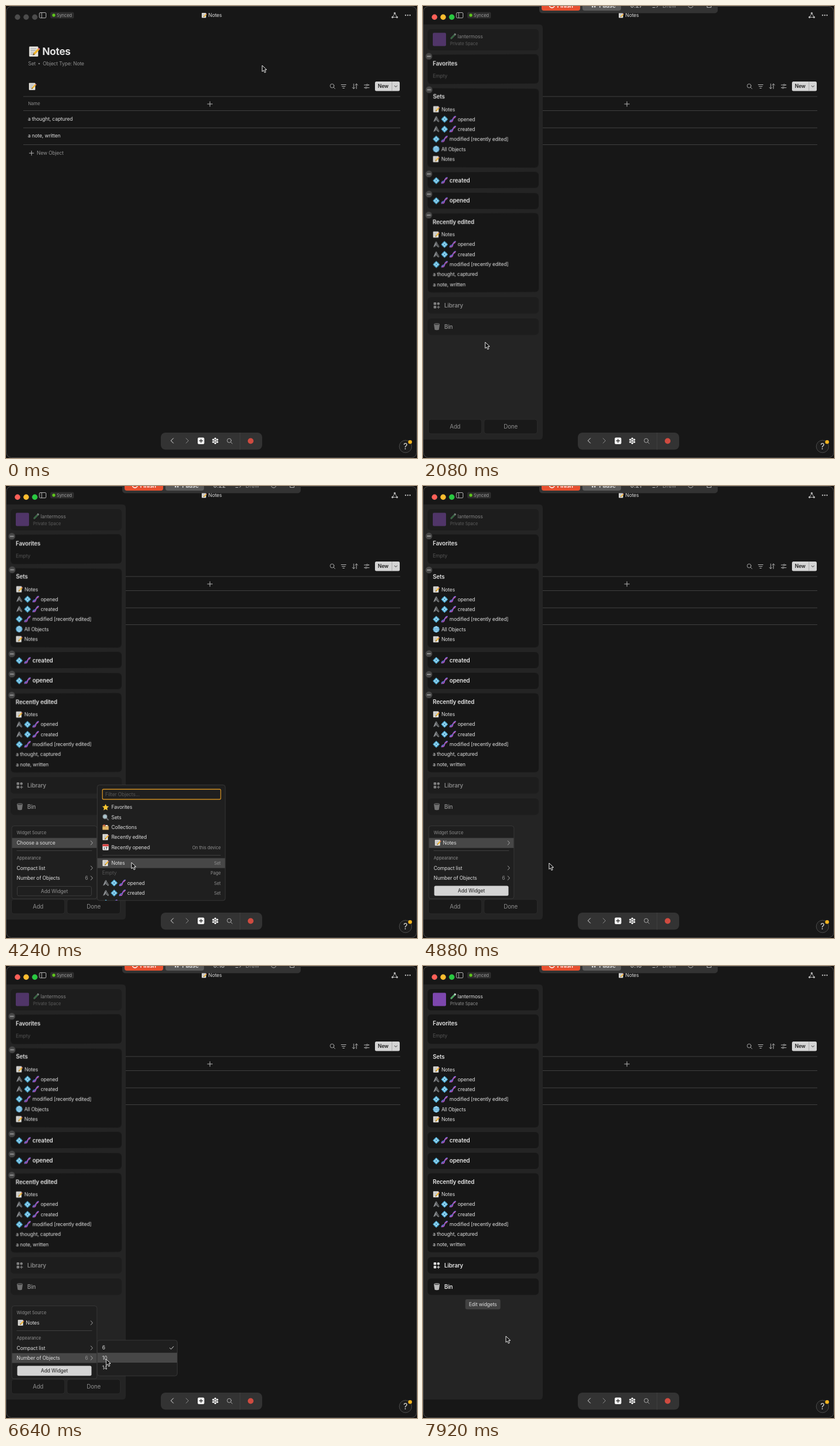
Write an HTML page that moves like this. It is 714 px wide and 784 px high and loops after 8000 ms.

```html
<!DOCTYPE html>
<html lang="en">
<head>
<meta charset="utf-8">
<title>Notes</title>
<style>
html, body { margin: 0; width: 100%; height: 100%; overflow: hidden; background: #101010; }
svg.stage { display: block; width: 714px; height: 784px; }
text { font: 400 8.66px Inter, sans-serif; letter-spacing: -.13px; fill: #dedede; white-space: pre; }
.small { font-size: 7.43px; letter-spacing: -.03px; }
.dim { fill: #8f8f8f; }
.faint { fill: #555; }
.head { font-size: 9.9px; font-weight: 600; fill: #e4e4e4; }
.btn { font-size: 9.9px; fill: #8d8d8d; }
.mid { text-anchor: middle; }
.end { text-anchor: end; }
.line { fill: none; stroke: #b4b4b4; stroke-linecap: round; stroke-linejoin: round; }
.rule { stroke: #404040; stroke-width: 1; }
.card { fill: #171717; }
.pop { fill: #1f1f1f; stroke: #3d3d3d; stroke-width: .8; }
.hover { fill: #474747; }
.side { animation: slide 8s infinite; }
.fade { animation: dim 8s step-end infinite; }
.cursor { animation: point 8s ease-in-out infinite; }
@keyframes slide {
  0%, 9% { transform: translateX(-212px); animation-timing-function: ease-out; }
  12%, 100% { transform: none; }
}
@keyframes dim {
  0% { opacity: 1; }
  19% { opacity: .5; }
  94%, 100% { opacity: 1; }
}
@keyframes point {
  0%, 4% { transform: translate(445px, 103px); }
  9%, 11% { transform: translate(5px, 250px); }
  18%, 27% { transform: translate(108px, 583px); }
  32%, 33% { transform: translate(56px, 724px); }
  38%, 43% { transform: translate(106px, 621px); }
  51%, 59% { transform: translate(218px, 653px); }
  61%, 65% { transform: translate(219px, 654px); }
  73%, 76% { transform: translate(110px, 675px); }
  81%, 84% { transform: translate(174px, 682px); }
  88%, 90% { transform: translate(86px, 697px); }
  93%, 94% { transform: translate(150px, 724px); }
  98%, 100% { transform: translate(144px, 642px); }
}
</style>
</head>
<body>
<svg class="stage" viewBox="0 0 714 784">
<defs>
  <symbol id="memo" viewBox="0 0 16 16">
    <rect x="1" y="1" width="12.5" height="14" rx="1" fill="#e6e4de"/>
    <path d="M3 4h8M3 6.5h7M3 9h5M3 11.5h4" stroke="#9a9ea6" stroke-width=".9"/>
    <path d="M6 13.2l1-3 6-6.4 2 1.9-6 6.4z" fill="#f0b429"/>
    <path d="M13 3.8l1.2-1.2 2 1.9L15 5.7z" fill="#e0707a"/>
    <path d="M6 13.2l1-3 2 1.9z" fill="#6b5136"/>
  </symbol>
  <symbol id="clip" viewBox="0 0 16 16">
    <path d="M2 14L7 2.5q1.5-1.6 2.3.5L5.5 12q-1 1.500-1.600 0L7 5M9 4l5 8q.6 2.500-1.600 1.800L8 7M11 13L8.500 9" fill="none" stroke="#a9adb2" stroke-width="1.2"/>
  </symbol>
  <symbol id="dia" viewBox="0 0 16 16">
    <path d="M8 0l8 8-8 8-8-8z" fill="#58b8e0"/>
    <path d="M8 3.200L12.800 8 8 12.800 3.200 8z" fill="#c4edf8"/>
    <path d="M8 5.500L10.500 8 8 10.500 5.500 8z" fill="#4aa5d8"/>
    <path d="M3 3l10 10M13 3L3 13" stroke="#2f84b8" stroke-width=".8"/>
  </symbol>
  <symbol id="dna" viewBox="0 0 16 16">
    <path d="M1 15C1 8 8 11 9 7s3-6 6-6" fill="none" stroke="#4579d8" stroke-width="2.300"/>
    <path d="M1 13c5 2 7-1 7-5s4-3 7-7" fill="none" stroke="#a755c8" stroke-width="2.300"/>
    <path d="M3 10l3 3M10 4l3 2M11 2.500l2.500 2" stroke="#d8668f"/>
  </symbol>
  <symbol id="globe" viewBox="0 0 16 16">
    <circle cx="8" cy="8" r="7.500" fill="#4aa3d4"/>
    <path d="M8 .5v15M.5 8h15M2 4h12M2 12h12M8 .5q-8 7.500 0 15M8 .5q8 7.500 0 15" fill="none" stroke="#cdeaf6" stroke-width=".9"/>
  </symbol>
  <symbol id="tube" viewBox="0 0 16 16">
    <path d="M3 13L13 3" stroke="#b9d3c5" stroke-width="4" stroke-linecap="round"/>
    <path d="M3 13l7-7" stroke="#3fa655" stroke-width="3.200" stroke-linecap="round"/>
    <path d="M11 1l4 4" stroke="#d6e2dd" stroke-width="1.500"/>
  </symbol>
  <symbol id="star" viewBox="0 0 16 16"><path d="M8 .5l2.300 5 5.300.6-4 3.700 1.100 5.400L8 12.500l-4.700 2.700 1.100-5.400-4-3.700 5.300-.6z" fill="#f7c531"/></symbol>
  <symbol id="lens" viewBox="0 0 16 16">
    <path d="M9 9l5 5" stroke="#6e6e72" stroke-width="2.800" stroke-linecap="round"/>
    <circle cx="6.500" cy="6.500" r="5" fill="#a9c3cc" stroke="#77797d" stroke-width="1.400"/>
  </symbol>
  <symbol id="box" viewBox="0 0 16 16">
    <path d="M1 3h5l1 1.500h8V14H1z" fill="#b9813d"/><path d="M3 2h4v3H3z" fill="#d65d4a"/>
    <path d="M8 3h5v3H8z" fill="#e9e4d6"/><path d="M1 6.500h14V14H1z" fill="#e0b566"/>
  </symbol>
  <symbol id="cal" viewBox="0 0 16 16">
    <rect x="1" y="1" width="14" height="14" rx="1.500" fill="#eee"/><path d="M1 2.500q0-1.500 1.500-1.500h11q1.500 0 1.500 1.500V6H1z" fill="#d64545"/>
    <path d="M5 8v5.500M8 8.300h3.500L9 13.500" fill="none" stroke="#333" stroke-width="1.300"/>
  </symbol>
  <symbol id="search" viewBox="0 0 12 12"><circle cx="5.200" cy="5.200" r="3.900" class="line"/><path d="M8.200 8.200L11 11" class="line"/></symbol>
  <symbol id="next" viewBox="0 0 6 10"><path d="M1.200 1.200L4.600 5 1.200 8.800" class="line"/></symbol>
  <clipPath id="listClip"><rect x="159" y="519" width="222" height="199.500"/></clipPath>
  <clipPath id="loadClip"><rect x="159" y="570" width="222" height="23.500"/></clipPath>
</defs>

<rect x=".5" y=".5" width="713" height="783" rx="9" fill="#171717" stroke="#4b4b4b"/>

<!-- page -->
<use href="#memo" x="39" y="69" width="20" height="20"/>
<text x="63" y="85" style="font-size:17.6px;font-weight:700;letter-spacing:-.35px">Notes</text>
<text x="38.500" y="102.800" class="dim">Set</text><circle cx="57.500" cy="100" r="1.200" fill="#8f8f8f"/>
<text x="64" y="102.800" class="dim">Object Type: Note</text>
<use href="#memo" x="39" y="132.500" width="14" height="14"/>
<use href="#search" x="562" y="134" width="10.500" height="10.500"/>
<path class="line" d="M582.300 136.500h8.400M583.700 139.500h5.600M585.200 142.500h2.600M604 135v8.500M601.800 141.300l2.200 2.200 2.200-2.200M608.800 143.500V135M606.600 137.200l2.200-2.200 2.200 2.200M622.300 137h3.600M629 137h2M622.300 141.700h1.600M627 141.700h4"/>
<g class="line"><circle cx="627.500" cy="137" r="1.400"/><circle cx="625.400" cy="141.700" r="1.400"/></g>
<rect x="641" y="131" width="43" height="16.500" rx="2.500" fill="#d4d4d4"/>
<path d="M670.500 131v16.500" stroke="#9a9a9a" stroke-width=".7"/>
<text x="646" y="142.300" style="font-weight:600;fill:#1d1d1d">New</text>
<path class="line" d="M675 138.300l2.200 2.200 2.200-2.200" style="stroke:#333"/>
<path class="rule" d="M30 157h655M30 181.500h655M30 211.300h655M30 240.500h655"/>
<text x="38.500" y="171.800" class="small dim">Name</text>
<path class="line" d="M350 170h8.500M354.250 165.800v8.400M40.500 255.200h7.600M44.300 251.400v7.600"/>
<text x="38" y="198.700">a thought, captured</text>
<text x="38" y="228.300">a note, written</text>
<text x="53.500" y="258.200" class="dim">New Object</text>

<!-- title bar -->
<g fill="#4b4b4b"><circle cx="20" cy="19.200" r="4.700"/><circle cx="35" cy="19.200" r="4.700"/><circle cx="50" cy="19.200" r="4.700"/></g>
<g data-on="4 100"><circle cx="20" cy="19.200" r="4.700" fill="#fe5f57"/><circle cx="35" cy="19.200" r="4.700" fill="#febc2e"/><circle cx="50" cy="19.200" r="4.700" fill="#28c840"/></g>
<g class="line"><rect x="58" y="11.500" width="11.500" height="9.200" rx="1.500"/><path d="M62 11.500v9.200"/></g>
<rect x="77" y="10.500" width="41" height="11" rx="2.500" fill="#2d2d2d"/><circle cx="83" cy="16" r="2.700" fill="#5dc41c"/>
<text x="88" y="18.700" class="small" style="fill:#9c9c9c">Synced</text>
<use href="#memo" x="339.500" y="11.500" width="9.500" height="9.500"/><text x="351.500" y="19">Notes</text>
<path class="line" d="M675.300 13l-3.800 6.500h7.600z"/>
<g fill="#b4b4b4"><circle cx="675.300" cy="12.500" r="1.700"/><circle cx="671.400" cy="19.500" r="1.700"/><circle cx="679.300" cy="19.500" r="1.700"/>
<circle cx="694.200" cy="16" r="1.200"/><circle cx="698" cy="16" r="1.200"/><circle cx="701.800" cy="16" r="1.200"/></g>

<g class="side" id="side"></g>

<!-- recorder bar -->
<g data-on="0 1">
  <rect x="150" y="-20" width="414.500" height="32.500" rx="5" fill="#333"/>
  <rect x="154" y="-12" width="67" height="19.500" rx="4" fill="#3f8ae0"/>
  <path class="line" d="M164 2l4-4M171 2l-3-4" style="stroke:#fff"/>
  <text x="174" y="2" class="head" style="fill:#fff">Starting</text><text x="236" y="2" class="head dim">0:00</text>
  <path class="line" d="M544.500 2.500l8-8M552.500 2.500l-8-8M530.500 0v2"/>
</g>
<g data-on="1 100">
  <rect x="202" y="-20" width="310" height="32.500" rx="5" fill="#333"/>
  <rect x="206" y="-12" width="67" height="20" rx="4" fill="#e8502f"/><rect x="277" y="-12" width="67" height="20" rx="4" fill="#5a5a5a"/>
  <circle cx="224" cy="-1.500" r="4.500" fill="none" stroke="#fff" stroke-width="1.300"/>
  <text x="233" y="2.500" class="head" style="fill:#fff">Finish</text>
  <path d="M294.500-6v8.500M298.500-6v8.500" stroke="#eee" stroke-width="2"/><text x="306" y="2.500" class="head">Pause</text>
  <text id="clock" x="360" y="2.500" class="head" style="fill:#aaa"></text>
  <path class="line" d="M399 2.500h4M406 2.500l4-5"/><text x="416" y="2.500" class="btn">Draw</text>
  <circle class="line" cx="465" cy="-1.500" r="4.500"/><path class="line" d="M493.500-4v6.500h7V-4"/>
</g>

<!-- dock -->
<rect x="269" y="740" width="176" height="29.500" rx="8" fill="#333"/>
<path class="line" d="M290.700 749.800l-4.200 4.200 4.200 4.200" style="stroke:#e4e4e4"/>
<path class="line" d="M312.800 749.800l4.200 4.200-4.200 4.200" style="stroke:#8b8b8b"/>
<rect x="333" y="748.500" width="11.500" height="11.500" rx="2.200" fill="#f2f2f2"/><path d="M338.750 751v6.500M335.500 754.250h6.500" stroke="#333" stroke-width="1.300"/>
<g id="flower" fill="#f2f2f2"><circle cx="363.500" cy="754.200" r="1.700"/></g>
<use href="#search" x="383" y="749" width="11" height="11"/>
<path d="M406.500 740v29.500" stroke="#3f3f3f"/>
<circle cx="425" cy="754.500" r="5" fill="#cf4b40"/>
<circle cx="694" cy="764" r="10.800" fill="#1d1d1d" stroke="#4b4b4b"/>
<text x="694" y="769" class="mid" style="font-size:14.500px">?</text>
<circle cx="702" cy="756.200" r="3.300" fill="#f6b51e"/>

<!-- widget menu -->
<g data-on="33 90">
  <rect class="pop" x="10" y="589.500" width="148" height="126.500" rx="4"/>
  <text x="18.500" y="604" class="small dim">Widget Source</text>
  <rect class="hover" x="10.400" y="610.500" width="147.200" height="17.300" data-on="38 66"/>
  <text x="18.500" y="622" data-on="0 60">Choose a source</text>
  <g data-on="60 100"><use href="#memo" x="20" y="613" width="11.500" height="11.500"/><text x="34.500" y="621.500">Notes</text></g>
  <path class="rule" d="M18.500 632.500h131"/>
  <text x="18.500" y="648" class="small dim">Appearance</text>
  <text x="18.500" y="665.500">Compact list</text>
  <rect class="hover" x="10.400" y="671.500" width="147.200" height="17" data-on="73 86"/>
  <text x="18.500" y="683">Number of Objects</text>
  <text x="142.500" y="683" class="dim end" data-on="0 84">6</text><text x="142.500" y="683" class="dim end" data-on="84 100">10</text>
  <use href="#next" x="146" y="614.500" width="6" height="9"/><use href="#next" x="146" y="658" width="6" height="9"/><use href="#next" x="146" y="675.500" width="6" height="9"/>
  <g data-on="0 60"><rect x="19.500" y="694.500" width="129" height="16.300" rx="2.500" fill="none" stroke="#3d3d3d"/><text x="84" y="705.600" class="mid dim">Add Widget</text></g>
  <g data-on="60 100"><rect x="19.500" y="693.500" width="129" height="17.300" rx="2.500" fill="#d4d4d4"/><text x="84" y="705" class="mid" style="fill:#1d1d1d">Add Widget</text></g>
</g>
<g data-on="39 42">
  <rect class="pop" x="158.500" y="570" width="222.500" height="98" rx="4"/>
  <g clip-path="url(#loadClip)"><rect x="167.500" y="577" width="205.500" height="24" rx="2" fill="none" stroke="#d08e22" stroke-width="1.300"/></g>
  <text x="172.500" y="588.800" class="faint">Filter Objects...</text><path d="M172.800 580v11" stroke="#e4e4e4" stroke-width=".9"/>
  <g fill="#d0d0d0"><circle cx="263.300" cy="629" r="1.200"/><circle cx="270.400" cy="629" r="1.200"/><circle cx="277.500" cy="629" r="1.200"/></g>
</g>
<g data-on="42 60">
  <rect class="pop" x="158.500" y="518.500" width="222.500" height="200.500" rx="4"/>
  <rect x="167.500" y="526" width="205.500" height="17.500" rx="2" fill="none" stroke="#d08e22" stroke-width="1.300"/>
  <text x="172.500" y="537.800" class="faint">Filter Objects...</text>
  <rect class="hover" x="159" y="645.500" width="221.600" height="17.200" data-on="51 60"/>
  <path class="rule" d="M167.500 640.500h205.500"/>
  <g id="list" clip-path="url(#listClip)"></g>
</g>
<g data-on="74 84">
  <rect class="pop" x="158.500" y="649" width="139" height="62" rx="4"/>
  <rect class="hover" x="159" y="670.800" width="138" height="17.200" data-on="80 84"/>
  <text x="167" y="665.300">6</text><text x="167" y="682.500">10</text><text x="167" y="700">14</text>
  <path class="line" d="M284.500 662.500l2.200 2.200 4.300-4.700" style="stroke:#ddd"/>
</g>

<path class="cursor" d="M0 0v10.800l2.500-2.300 1.800 4.100 2-.9-1.800-4h3.500z" fill="#111" stroke="#eee" stroke-width="1" stroke-linejoin="round"/>
</svg>

<script>
const LOOP = 8000;
const $ = id => document.getElementById(id);

const icon = (id, x, y, size = 12) =>
  `<use href="#${id}" x="${x}" y="${y - size / 2}" width="${size}" height="${size}"/>`;
const label = (x, y, str, cls = '') => `<text x="${x}" y="${y}" class="${cls}">${str}</text>`;

// icons in a row followed by text; y is the row's centre
const row = (x, y, icons, str, cls = '') =>
  icons.map((id, i) => icon(id, x + i * 14.4, y)).join('') +
  label(x + icons.length * 14.2 + (icons.length ? .7 : 0), y + 3.1, str, cls);

const panel = (y, h) => `<rect class="card" x="8" y="${y}" width="193" height="${h}" rx="6"/>`;
const widget = (y, h, body) => `<g class="wob" data-cy="${y + h / 2}">${panel(y, h)}${body}
  <g data-on="19 94"><circle cx="10.300" cy="${y + 2.800}" r="5.800" fill="#484848"/>
  <path d="M7 ${y + 2.800}h6.600" stroke="#b8b8b8" stroke-width="1.300"/></g></g>`;
const button = (x, w, str) => `<rect x="${x}" y="717" width="${w}" height="25" rx="4" fill="#191919" stroke="#2b2b2b"/>` +
  label(x + w / 2, 732.800, str, 'btn mid');

const pair = ['dia', 'dna'], trio = ['clip', ...pair];
const objects = [[['memo'], 'Notes'], [trio, 'opened'], [trio, 'created'], [pair, 'modified [recently edited]']];
const rows = (top, items) => items.map(([ic, s], i) => row(17, top + i * 17.300, ic, s)).join('');
const sets = [...objects, [['globe'], 'All Objects'], [['memo'], 'Notes']];
const recent = [...objects, [[], 'a thought, captured'], [[], 'a note, written']];

$('side').innerHTML = `
  <path d="M1 32h201q6 0 6 6v708q0 6-6 6H1z" fill="#242424"/>
  <g class="fade">${panel(40, 37)}<rect x="17" y="46.500" width="23" height="23" rx="2" fill="#7d47ad"/>
    ${icon('tube', 47, 52.500, 11)}${label(60, 55.700, 'lantermoss')}${label(47, 67.500, 'Private Space', 'small dim')}</g>
  ${widget(84, 51, label(17, 102.600, 'Favorites', 'head') + label(17, 124, 'Empty', 'faint'))}
  ${widget(143, 137, label(17, 161.200, 'Sets', 'head') + rows(179.400, sets))}
  ${widget(288, 28, row(17, 302.400, pair, 'created', 'head'))}
  ${widget(324, 28, row(17, 338.200, pair, 'opened', 'head'))}
  ${widget(359.500, 137, label(17, 377.500, 'Recently edited', 'head') + rows(396, recent))}
  <g class="fade">${panel(505, 28.500)}
    <g fill="#ddd"><rect x="18.500" y="514" width="4.500" height="4.500" rx="1"/><circle cx="26.700" cy="516.300" r="2.300"/>
    <rect x="18.500" y="520" width="4.500" height="4.500" rx="1"/><path d="M26.200 519.700h1.200v2h2v1.200h-2v2h-1.200v-2h-2v-1.200h2z"/></g>
    ${label(37, 522.500, 'Library', 'head')}</g>
  <g class="fade">${panel(542, 28.500)}
    <path d="M19 552.500l1.300 9q3.700 1.500 7.400 0l1.300-9z" fill="#bcbcbc"/>
    <ellipse cx="24" cy="552.300" rx="5" ry="1.600" fill="#555" stroke="#ddd" stroke-width=".8"/>
    ${label(37, 559.500, 'Bin', 'head')}</g>
  <g data-on="0 19"><use href="#edit"/></g>
  <g data-on="19 94">${button(9.500, 92.500, 'Add')}${button(106, 92.500, 'Done')}</g>`;

const edit = `<rect x="73.500" y="578" width="61" height="17.500" rx="3" fill="#414141"/>` + label(104, 589.700, 'Edit widgets', 'mid');
$('side').insertAdjacentHTML('beforeend', `<g data-on="0 19">${edit}</g><g data-on="94 100">${edit}</g>`);
$('side').querySelector('use[href="#edit"]').parentNode.remove();

const kind = (y, str) => label(373, y + 3, str, 'small dim end');
const sources = [['star', 'Favorites'], ['lens', 'Sets'], ['box', 'Collections'], ['memo', 'Recently edited'], ['cal', 'Recently opened']];
$('list').innerHTML =
  sources.map(([ic, s], i) => row(167, 557.200 + i * 17.300, [ic], '') + label(183, 560.300 + i * 17.300, s)).join('') +
  kind(626.500, 'On this device') +
  row(167, 654, ['memo'], '') + label(183, 657.100, 'Notes') + kind(654, 'Set') +
  label(167, 674.200, 'Empty', 'faint') + kind(671.200, 'Page') +
  row(167.500, 688.600, trio, 'opened') + kind(688.600, 'Set') +
  row(167.500, 706, trio, 'created') + kind(706, 'Set') +
  row(167.500, 723.300, pair, 'modified [recently edited]') + kind(723.300, 'Set');

$('flower').innerHTML += Array.from({ length: 6 }, (_, i) => {
  const a = Math.PI * (i / 3 + 1 / 6);
  return `<circle cx="${363.500 + 4 * Math.cos(a)}" cy="${754.200 + 4 * Math.sin(a)}" r="1.700"/>`;
}).join('');

// data-on="from to": percent of the loop during which an element shows
for (const el of document.querySelectorAll('[data-on]')) {
  const [from, to] = el.dataset.on.split(' ').map(n => n / 100);
  const key = (opacity, offset) => ({ opacity, offset, easing: 'step-end' });
  el.animate([key(0, 0), key(1, from), key(0, to), key(0, 1)], { duration: LOOP, iterations: Infinity });
}

const cards = document.querySelectorAll('.wob');
let start;
function draw(now) {
  start ??= now;
  const t = (now - start) % LOOP;
  const editing = t >= 1520 && t < 7520;
  const tilt = editing ? -.37 * Math.cos(2 * Math.PI * ((t - 2080) / 300 - .1)) : 0;
  cards.forEach((c, i) =>
    c.setAttribute('transform', `rotate(${i % 2 ? -tilt : tilt} 104.500 ${c.dataset.cy})`));
  $('clock').textContent = '0:' + Math.floor(31 - t * .00189);
  requestAnimationFrame(draw);
}
requestAnimationFrame(draw);
</script>
</body>
</html>
```
